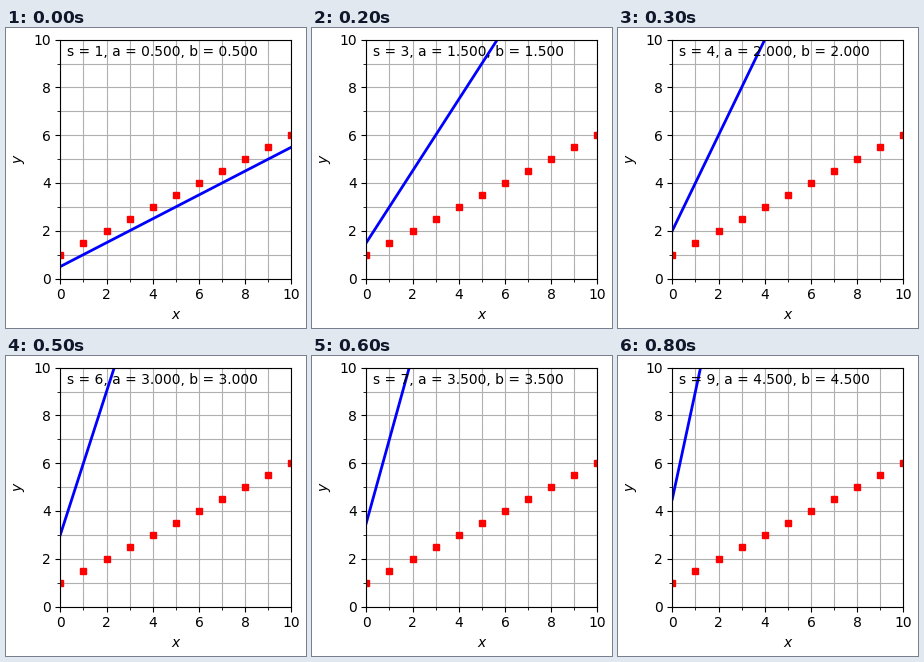
Write a matplotlib script that moves like this. It is 300 px wide and 300 px high and loops after 900 ms.

```python
import numpy as np
import matplotlib.pyplot as plt
from matplotlib.animation import FuncAnimation
from matplotlib.ticker import MultipleLocator

STEPS = 9
INTERVAL = 100
SIZE = 300

plt.rcParams["font.family"] = "DejaVu Sans"

fig = plt.figure(figsize=(3, 3), dpi=100)
left, right, bottom, top = 54.3, 285.4, 49.5, 288.3
ax = fig.add_axes([left / SIZE, bottom / SIZE,
                   (right - left) / SIZE, (top - bottom) / SIZE])
ax.set(xlim=(0, 10), ylim=(0, 10), xlabel="$x$", ylabel="$y$")
for axis in (ax.xaxis, ax.yaxis):
    axis.set_major_locator(MultipleLocator(2))
    axis.set_minor_locator(MultipleLocator(1))
ax.grid(True, which="both")

x = np.arange(11)
ax.plot(x, 0.5 * x + 1, "rs", markersize=5)
line, = ax.plot([], [], "b-", linewidth=2)
label = ax.text(0.3, 9.3, "")


def update(i):
    s = i + 1
    a = b = 0.5 * s
    line.set_data(x, a * x + b)
    label.set_text(f"s = {s}, a = {a:.3f}, b = {b:.3f}")
    return line, label


anim = FuncAnimation(fig, update, frames=STEPS, interval=INTERVAL,
                     repeat=True, repeat_delay=0)
plt.show()
```
